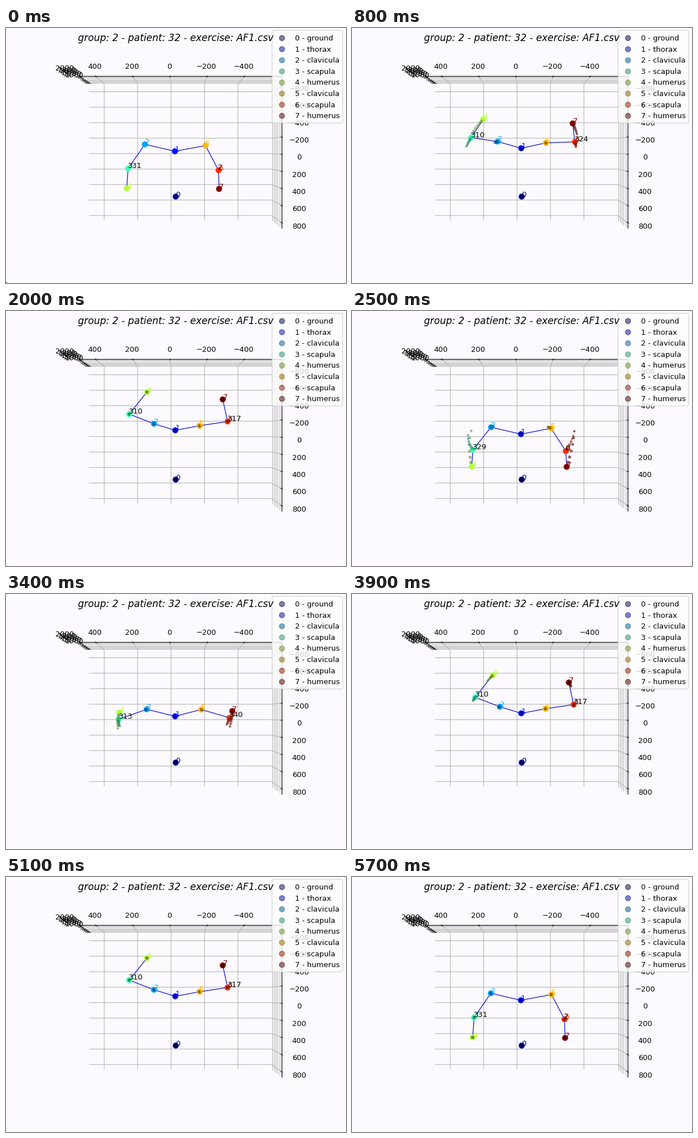
Write a matplotlib script that moves like this. It is 600 px wide and 450 px high and loops after 5.8 s.

```python
import matplotlib.pyplot as plt
import numpy as np
from matplotlib.animation import FuncAnimation
from matplotlib.patches import FancyBboxPatch

W, H, DPI = 600, 450, 93.75
FRAMES, STEP = 58, 100
TRAIL = np.arange(150, 0, -25)

NAMES = ["ground", "thorax", "clavicula", "scapula", "humerus",
         "clavicula", "scapula", "humerus"]
JET = plt.get_cmap("jet")(np.arange(8) / 7)[:, :3]
DIM = JET * 0.55
CHAIN = [4, 3, 2, 1, 5, 6, 7]

# Joints with the arms down and up, and how far they swing off the
# straight way between the two
REST = np.array([(299.5, 297.5), (298, 217.5), (245, 205.3), (215.5, 248),
                 (213, 283), (352, 207.5), (375, 251), (376, 284)])
TOP_POSE = np.array([(299.5, 297.5), (298.7, 210.5), (261, 199), (217.5, 182),
                     (248.7, 143), (341.5, 202.5), (391, 195), (382.5, 156)])
SWING = np.array([(0, 0), (0, 2), (-5, 1.5), (-18, 8),
                  (-32, 0), (-2, -1), (11, -3), (20, -10)])

# Start, duration and final lift of each arm movement
MOVES = [(0, 1030, 1), (2143, 420, 0), (2830, 1100, 1), (5220, 340, 0)]


def lift(t):
    """Lift of the arms from 0 to 1, and the width of their arc."""
    u, width = 0, 1
    for start, length, goal in MOVES:
        if t >= start:
            p = min((t - start) / length, 1)
            u += (goal - u) * p * p * (3 - 2 * p)
            width = 1 if goal else 0.65
    return u, width


def pose(t):
    u, width = lift(t)
    arc = width * np.sin(np.pi * u)
    joints = REST + (TOP_POSE - REST) * u + SWING * arc
    return joints, (331 - 21 * u - 7 * arc, 362 - 45 * u + 2 * arc)


fig = plt.figure(figsize=(W / DPI, H / DPI), dpi=DPI, facecolor="#fcfafe")
ax = fig.add_axes([0, 0, 1, 1])
ax.set_xlim(0, W)
ax.set_ylim(H, 0)
ax.axis("off")

# Box in perspective: back wall, side wall and top
CX, CY, FRONT = 308, 212, 1.112
LEFT, RIGHT, TOP, BOTTOM = 147, 469, 98, 339


def proj(x, y, s=FRONT):
    return CX + (x - CX) * s, CY + (y - CY) * s


def line(*pts, color="#b0b0b0", z=1):
    xs, ys = zip(*pts)
    ax.plot(xs, ys, color=color, lw=0.8, zorder=z)


def tick(x, y):
    line(proj(x, y, FRONT - 0.012), proj(x, y, FRONT + 0.006),
         color="k", z=2)


def label(x, y, s, **kw):
    kw = {"ha": "center", "va": "center", "fontsize": 10, "zorder": 3, **kw}
    return ax.text(x, y, str(s).replace("-", "\u2212")
                   if isinstance(s, int) else s, **kw)


grid_x = 173.3 + 59 * np.arange(5)
grid_y = 112.5 + 27.3 * np.arange(9)
depth = 1 / np.linspace(1 / 1.005, 1 / (FRONT - 0.004), 6)

for x in grid_x:
    line(proj(x, TOP), (x, TOP), (x, BOTTOM))
for y in grid_y:
    line((LEFT, y), (RIGHT, y), proj(RIGHT, y))
for s in depth:
    line(proj(LEFT, TOP, s), proj(RIGHT, TOP, s), proj(RIGHT, BOTTOM, s))

# Axis lines, ticks and tick labels
line((LEFT, TOP), proj(LEFT, TOP), proj(RIGHT, TOP), proj(RIGHT, BOTTOM),
     color="k", z=2)
for x, v in zip(grid_x, range(400, -401, -200)):
    tick(x, TOP)
    label(proj(x, TOP)[0] - 1.6, 68, v)
for y, v in zip(grid_y, range(-800, 801, 200)):
    tick(RIGHT, y)
    label(517, proj(RIGHT, y)[1] + 6, v)
for s, v in zip(depth, range(1000, 2001, 200)):
    x, y = proj(LEFT, TOP, s)
    line((x - 6, y), (x + 3, y), color="k", z=2)
    label(x - 26.5, y - 13.8, v)

label(300, 23.2, "group: 2 - patient: 32 - exercise: AF1.csv",
      va="baseline", fontsize=13, style="italic", zorder=12)

# Legend
ax.add_patch(FancyBboxPatch((469.5, 4), 124.5, 163.5,
                            boxstyle="round,pad=0,rounding_size=2.6",
                            fc="white", ec="#cccccc", lw=1, alpha=0.8,
                            zorder=10))
rows = 17.8 + 19.6 * np.arange(8)
ax.scatter([487] * 8, rows, s=50, c=DIM, alpha=0.5, zorder=11)
for i, (y, name) in enumerate(zip(rows, NAMES)):
    label(510.5, y + 4.2, f"{i} - {name}", ha="left", va="baseline",
          zorder=11)

# Moving parts
bones, = ax.plot([], [], color="#0000cd", lw=0.9, zorder=4)
dots = ax.scatter(*REST.T, s=50, c=JET, zorder=5)
trail = ax.scatter([], [], alpha=0.5, zorder=6)
tags = [label(0, 0, f"{i}", ha="left", va="baseline", color=JET[i], zorder=7)
        for i in range(8)]
angles = [label(0, 0, "", ha="left", va="baseline", zorder=8)
          for _ in range(2)]


def update(k):
    t = k * STEP
    joints, degrees = pose(t)
    bones.set_data(*joints[CHAIN].T)
    dots.set_offsets(joints)

    past = [pose(t - dt)[0] for dt in TRAIL if t >= dt]
    trail.set_offsets(np.vstack(past) if past else np.empty((0, 2)))
    trail.set_sizes(np.repeat(np.linspace(5, 12, len(TRAIL)), 8))
    colors = np.tile(DIM, (len(TRAIL), 1))
    trail.set_facecolor(colors)
    trail.set_edgecolor(colors)

    for tag, p in zip(tags, joints):
        tag.set_position(p)
    for text, j, a in zip(angles, (3, 6), degrees):
        text.set_position(joints[j] - 1)
        text.set_text(f"{round(a) % 360}")
    return [bones, dots, trail, *tags, *angles]


anim = FuncAnimation(fig, update, frames=FRAMES, interval=STEP,
                     repeat=True, repeat_delay=0, blit=False)
plt.show()
```
